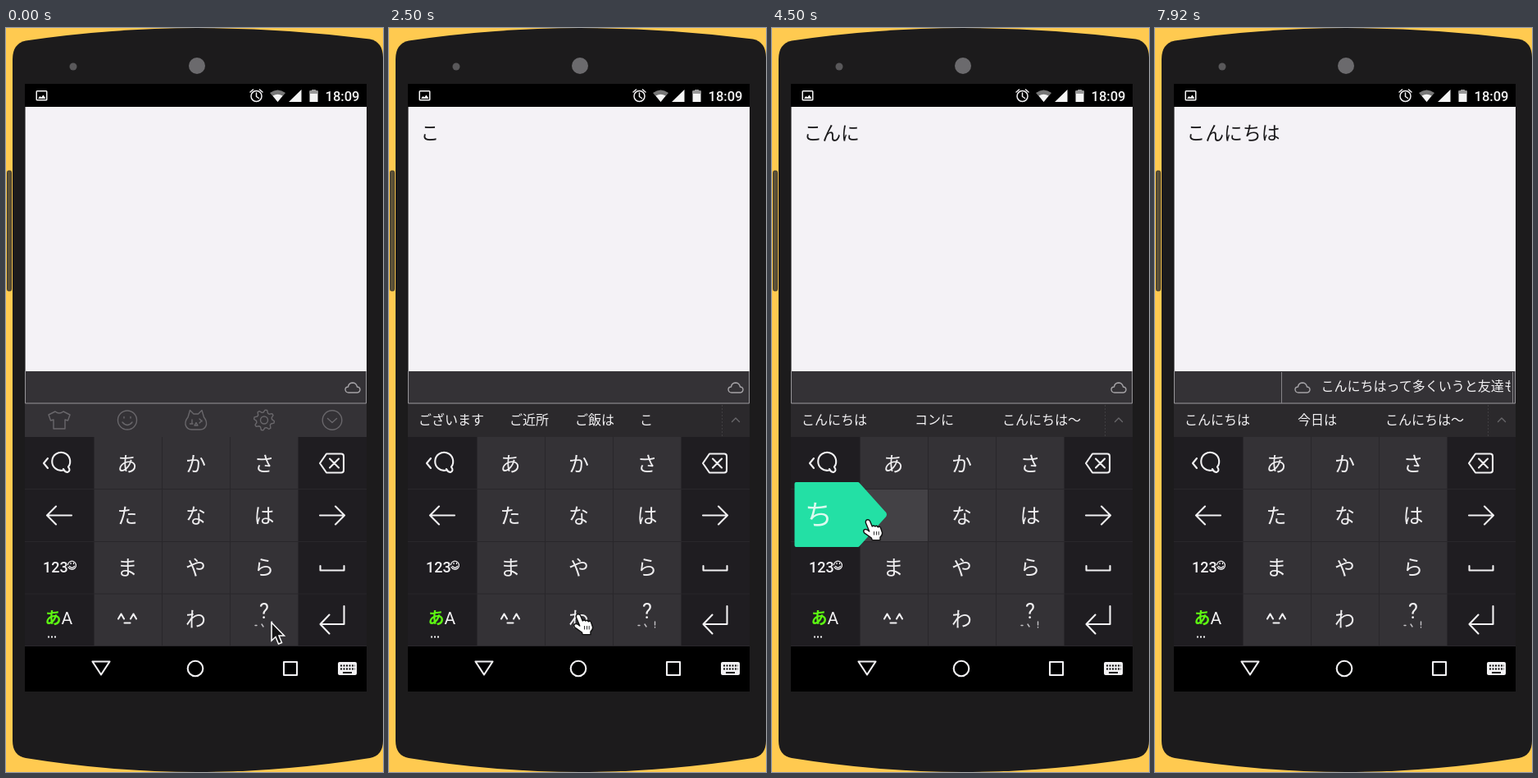
These frames come from a looping animation (460x906 px, 8 s). An HTML page:

```html
<!DOCTYPE html>
<html lang="ja">
<head>
<meta charset="utf-8">
<title>Flick input</title>
<style>
html, body { margin: 0; width: 100%; height: 100%; overflow: hidden; background: #ffca50; }
svg { display: block; width: 460px; height: 906px; }
text { font-family: "Noto Sans CJK JP", "Noto Sans CJK", sans-serif; }
.latin { font-family: Roboto, sans-serif; }
.line { fill: none; stroke: #f2f1f3; stroke-width: 2.1; stroke-linecap: round; stroke-linejoin: round; }
.dim { fill: none; stroke: #69676b; stroke-width: 1.4; stroke-linejoin: round; stroke-linecap: round; }
.kana { font-size: 25px; font-weight: 500; fill: #efeef0; text-anchor: middle; }
.word { font-size: 16px; fill: #f2f1f3; }
</style>
</head>
<body>
<svg viewBox="0 0 460 906">
  <defs>
    <clipPath id="strip"><rect x="24" y="419" width="409.500" height="38"/></clipPath>
    <path id="cloud" d="M-5 6H5.500Q9 5.500 9 2Q8.500-1 5.500-1Q4.500-6-.5-6Q-5-5.500-5.500-1Q-9-1-9 2.500Q-8.500 6-5 6Z"/>
  </defs>
  <rect width="460" height="906" fill="#ffca50"/>
  <rect x="1.500" y="174" width="5" height="146" rx="1.500" fill="#5e5238" stroke="#3a3528"/>
  <path fill="#1c1b1c" d="M8 38Q8 19 24 15.500Q130 0 233 0Q340 0 444 13.500Q460 17 460 36V868Q460 886 444 889Q335 906 233 906Q130 906 24 889Q8 886 8 868Z"/>
  <circle cx="233" cy="46" r="10" fill="#6b6a6d"/>
  <circle cx="82" cy="47" r="4.500" fill="#59585a"/>
  <rect x="23" y="68" width="417" height="740"/>

  <g fill="#f4f4f4">
    <path fill-rule="evenodd" d="M38 76H49Q50.500 76 50.500 77.500V87Q50.500 88.500 49 88.500H38Q36.500 88.500 36.500 87V77.500Q36.500 76 38 76ZM38 77.500V87H49V77.500ZM39 86L41.500 83L43 84.500L45.500 81.500L48.500 86Z"/>
    <path d="M322 79Q331.500 72 341 79L331.500 90Z" fill="#777"/>
    <path d="M325.500 82.500Q331.500 79 337.500 82.500L331.500 90Z"/>
    <path d="M345 90L360.500 75V90Z"/>
    <path d="M373.500 75H377.500V76.500H380.500V90H370.500V76.500H373.500Z"/>
    <path d="M373.500 75H377.500V76.500H380.500V80H370.500V76.500H373.500Z" fill="#999"/>
    <text class="latin" x="389.500" y="88.500" font-size="16.500" font-weight="500">18:09</text>
  </g>
  <g class="line" style="stroke-width:1.500">
    <circle cx="305.500" cy="83" r="6.500"/>
    <path d="M305.500 79V83.500L308.500 85.500M298 78L301.500 75M313 78L309.500 75"/>
  </g>

  <rect x="23.500" y="96" width="416.500" height="322" fill="#f4f2f6"/>
  <text id="typed" x="38.500" y="136" font-size="22.800" font-weight="500" fill="#19181a"></text>
  <rect x="23" y="418" width="417" height="80" fill="#343236"/>
  <path d="M23.500 418V457H439.500V418" fill="none" stroke="#98969a"/>
  <g clip-path="url(#strip)"><g id="cloudMove">
    <path id="cloudEdge" d="M154.500 418V457" stroke="#858387"/>
    <use href="#cloud" x="180" y="438" class="dim" style="stroke:#a5a3a7"/>
    <text class="word" x="202.500" y="441.500">こんにちはって多くいうと友達も</text>
  </g></g>
  <path id="cloudEnd" d="M436.500 419V457" stroke="#858387"/>

  <g id="tools" class="dim">
    <path d="M60 467L52 471L54.500 478L58 477V488H72V477L75.500 478L78 471L70 467Q65 471 60 467Z"/>
    <circle cx="148" cy="477.500" r="11.500"/>
    <path d="M142 480Q148 487 154 480M144 473.500V475M152 473.500V475"/>
    <path d="M222 474L224.500 465.500L229 470H234.500L239 465.500L241.500 474Q245 478 244.500 483Q243 489 237 489H226.500Q220.500 489 219 483Q218.500 478 222 474ZM227 477V482M224.500 482H228M236 476L239 479M236 481L239 478M230 484L232 480.500L234 484Z"/>
    <path id="gear"/>
    <circle cx="315" cy="477.500" r="4.500"/>
    <circle cx="398" cy="477.500" r="11.800"/>
    <path d="M392.500 475.500L398 480.500L403.500 475.500"/>
  </g>
  <g id="words">
    <rect x="23" y="458" width="417" height="40" fill="#2b292c"/>
    <path d="M406.500 459V497" stroke="#403e42" stroke-dasharray="2 2"/>
    <path class="dim" d="M418.500 479.500L423 475L427.500 479.500"/>
    <g id="list" class="word"></g>
  </g>

  <rect x="23" y="498" width="417" height="255" fill="#29272b"/>
  <g id="keys"></g>
  <g class="line">
    <path d="M51 524L46 530L51 536M70 538.500A11 11 0 1 1 76 534.500Q79.500 539 75 541Q72 541 70 537"/>
    <path d="M80 593.500H50M61 582.500L50 593.500L61 604.500M383 593.500H413M402 582.500L413 593.500L402 604.500"/>
    <path d="M391 518.500H409Q412 518.500 412 521.500V538.500Q412 541.500 409 541.500H391L383 530ZM395 524.500L406 535.500M406 524.500L395 535.500"/>
    <path d="M383.500 655V660.500H412.500V655"/>
    <path d="M412.500 704V726H383.500M394.500 714.500L383.500 726L394.500 737.500"/>
    <path d="M137 719.500L140.500 713.500L144 719.500M152 719.500L155.500 713.500L159 719.500M144.500 724.500H151.500"/>
    <path style="stroke-width:1.300" d="M75.500 653.500A5 5 0 1 1 76 656.500M77.500 655.500Q80.500 659 83.500 655.500M79 651.500V652.500M82.500 651.500V652.500"/>
  </g>
  <g fill="#f2f1f3">
    <text class="latin" x="45" y="663" font-size="18" font-weight="500">123</text>
    <text class="latin" x="67.500" y="726" font-size="21">A</text>
    <text x="47.500" y="726" font-size="20" font-weight="700" fill="#5df712">あ</text>
    <path d="M51 741.500H53M55 741.500H57M59 741.500H61" stroke="#f2f1f3" stroke-width="2"/>
    <text class="latin" x="315" y="719" font-size="25" text-anchor="middle">?</text>
    <path class="dim" style="stroke:#c5c3c7" d="M304 727.500H306M312 726L314 729M324.500 723V727M324.500 729.500V730"/>
  </g>

  <g class="line">
    <path d="M105.500 771.500H126.500L116 787.500Z"/>
    <circle cx="231" cy="780" r="9.300"/>
    <path d="M339 772H355V788H339Z"/>
  </g>
  <rect x="405" y="772" width="23" height="16" rx="2" fill="#f2f1f3"/>
  <path d="M408 776.500H426M408 780.500H426" stroke="#000" stroke-width="2" stroke-dasharray="2 1.500"/>
  <path d="M411 785H422" stroke="#000" stroke-width="1.800"/>

  <g id="popup">
    <path id="flag" d="M-2 3Q0 1 2 3L37.500 35V110.500H-37.500V35Z" fill="#23e0a5" stroke="#23e0a5" stroke-width="4" stroke-linejoin="round"/>
    <text id="flagText" font-size="34" fill="#dcfaef" text-anchor="middle"></text>
  </g>
  <path id="arrow" d="M0 0V22L5 17.500L8.500 26L12.500 24.500L9 16H15.500Z" fill="#161516" stroke="#fff" stroke-width="1.500"/>
  <g id="hand"><g transform="scale(.88)" stroke="#111" stroke-linejoin="round">
    <path fill="#fff" stroke-width="1.600" d="M-3 2Q-2-1 1 0Q2 0 3 2L6 9Q8 7 10 9Q12 7 14 10Q17 8 18 12L20 18Q20 22 17 24V28H6L5 25L-5 18Q-7 15-5 13.500Q-2 12 2 16L-3 4Z"/>
    <path d="M8.500 16V21M12 16V21M15 16V21"/>
  </g></g>
</svg>
<script>
const $ = id => document.getElementById(id);
const set = (el, attrs) => { for (const k in attrs) el.setAttribute(k, attrs[k]); return el; };
const add = (parent, tag, attrs, text = "") => {
  const el = set(document.createElementNS("http://www.w3.org/2000/svg", tag), attrs);
  el.textContent = text;
  return parent.appendChild(el);
};
const show = (el, on) => { el.style.display = on ? "" : "none"; };
const FPS = 12, LOOP = 8000;

// Keyboard: 5 columns by 4 rows, kana in the middle three columns
const cols = [23, 108, 191, 274, 357, 441], rows = [498, 562, 626, 689.5, 753];
const kana = ["あかさ", "たなは", "まやら", " わ "];
const keys = {};
kana.forEach((line, r) => {
  for (let c = 0; c < 5; c++) {
    const mid = c > 0 && c < 4, ch = mid ? line[c - 1] : "";
    const rect = add($("keys"), "rect", {
      x: cols[c], y: rows[r], width: cols[c + 1] - cols[c] - 1,
      height: rows[r + 1] - rows[r] - 1, fill: mid ? "#343236" : "#1f1d21"
    });
    if (ch.trim()) {
      const label = add($("keys"), "text", { class: "kana", x: 148 + (c - 1) * 83.5, y: 539.5 + r * 63.3 }, ch);
      keys[ch] = { rect, label };
    }
  }
});

let gear = "";
for (let i = 0; i < 32; i++) {
  const a = (i + .5) * Math.PI / 16, rad = i % 4 < 2 ? 12.5 : 9.5;
  gear += (i ? "L" : "M") + (315 + rad * Math.cos(a)).toFixed(1) + " " + (477.5 + rad * Math.sin(a)).toFixed(1);
}
$("gear").setAttribute("d", gear + "Z");

// Steps are counted at 12 per second
const presses = [
  { key: "か", from: 12, flick: 15, to: 21, out: "こ", x: 230.5, y: 527, turn: 0 },
  { key: "わ", from: 30, flick: 32, to: 38, out: "ん", x: 230.5, y: 723, turn: 180 },
  { key: "な", from: 40, flick: 42, to: 47, out: "に", x: 229, y: 598, turn: 90 },
  { key: "た", from: 52, flick: 53, to: 61, out: "ち", x: 140, y: 592.5, turn: 90 },
  { key: "は", from: 68, flick: 99, to: 71, out: "は" }
];
const suggestions = [
  [],
  [["ございます", 36], ["ご近所", 147], ["ご飯は", 227], ["こ", 306]],
  [["今週末", 36], ["こんな", 142], ["紺", 248], ["混ん", 322]],
  [["こんにちは", 36], ["コンに", 174], ["こんにちは〜", 281]],
  [["こんにちは", 36], ["今日", 174], ["こんにちは〜", 265]],
  [["こんにちは", 36], ["今日は", 174], ["こんにちは〜", 281]]
];
// step, x, y of the pointer tip
const path = [
  [0, 324, 724], [2, 324, 724], [10, 235, 530], [14, 236, 532], [17, 238.5, 579], [19, 239, 600],
  [21, 238, 602], [28, 231, 714], [31, 231, 714], [35, 231, 650], [38, 231, 648], [40, 235, 602],
  [41, 235, 602], [43, 212, 603], [45, 180, 603], [47, 178, 603], [51, 150, 599], [52, 150, 599],
  [54, 117, 599], [57, 66, 600], [61, 64, 600], [67, 315.5, 595], [73, 316, 595], [80, 475, 690], [96, 475, 690]
];
const ease = p => p * p * (3 - 2 * p);
function pointer(step) {
  const i = path.findIndex(p => p[0] > step), [t0, x0, y0] = path[i - 1], [t1, x1, y1] = path[i];
  const p = ease((step - t0) / (t1 - t0));
  return [x0 + (x1 - x0) * p, y0 + (y1 - y0) * p];
}

let shownCount = -1;
function setText(n) {
  if (n === shownCount) return;
  shownCount = n;
  $("typed").textContent = presses.slice(0, n).map(p => p.out).join("");
  $("list").textContent = "";
  for (const [word, x] of suggestions[n]) add($("list"), "text", { x, y: 483 }, word);
  show($("words"), n);
  show($("tools"), !n);
}

function draw(step) {
  setText(presses.filter(p => step >= p.to).length);
  const press = presses.find(p => step >= p.from && step < p.to);
  const flick = press && step >= press.flick;
  for (const k in keys) {
    const down = press && press.key === k && step > press.from;
    keys[k].rect.setAttribute("fill", down ? "#434145" : "#343236");
    show(keys[k].label, !(flick && press.key === k));
  }
  show($("popup"), flick);
  if (flick) {
    const { x, y, turn, out } = press;
    const side = turn === 90;
    set($("popup"), { transform: `translate(${x} ${y})` });
    set($("flag"), { transform: `rotate(${turn})` });
    set($("flagText"), { x: side ? -83 : 0, y: (side ? 0 : turn ? -75 : 77) + 12.5 });
    $("flagText").textContent = out;
  }
  const at = `translate(${pointer(step).join(" ")})`;
  set($("arrow"), { transform: at });
  set($("hand"), { transform: at });
  show($("hand"), press);
  show($("arrow"), !press);

  const slide = ease(Math.min(1, Math.max(0, (step - 80) / 7)));
  set($("cloudMove"), { transform: `translate(${243 * (1 - slide)} 0)` });
  show($("cloudEdge"), slide > 0);
  show($("cloudEnd"), slide > 0);
}

const start = performance.now();
function tick() {
  const t = (performance.now() - start) % LOOP;
  draw(Math.min(95, Math.floor(t * FPS / 1000 + .05)));
  requestAnimationFrame(tick);
}
tick();
</script>
</body>
</html>
```
